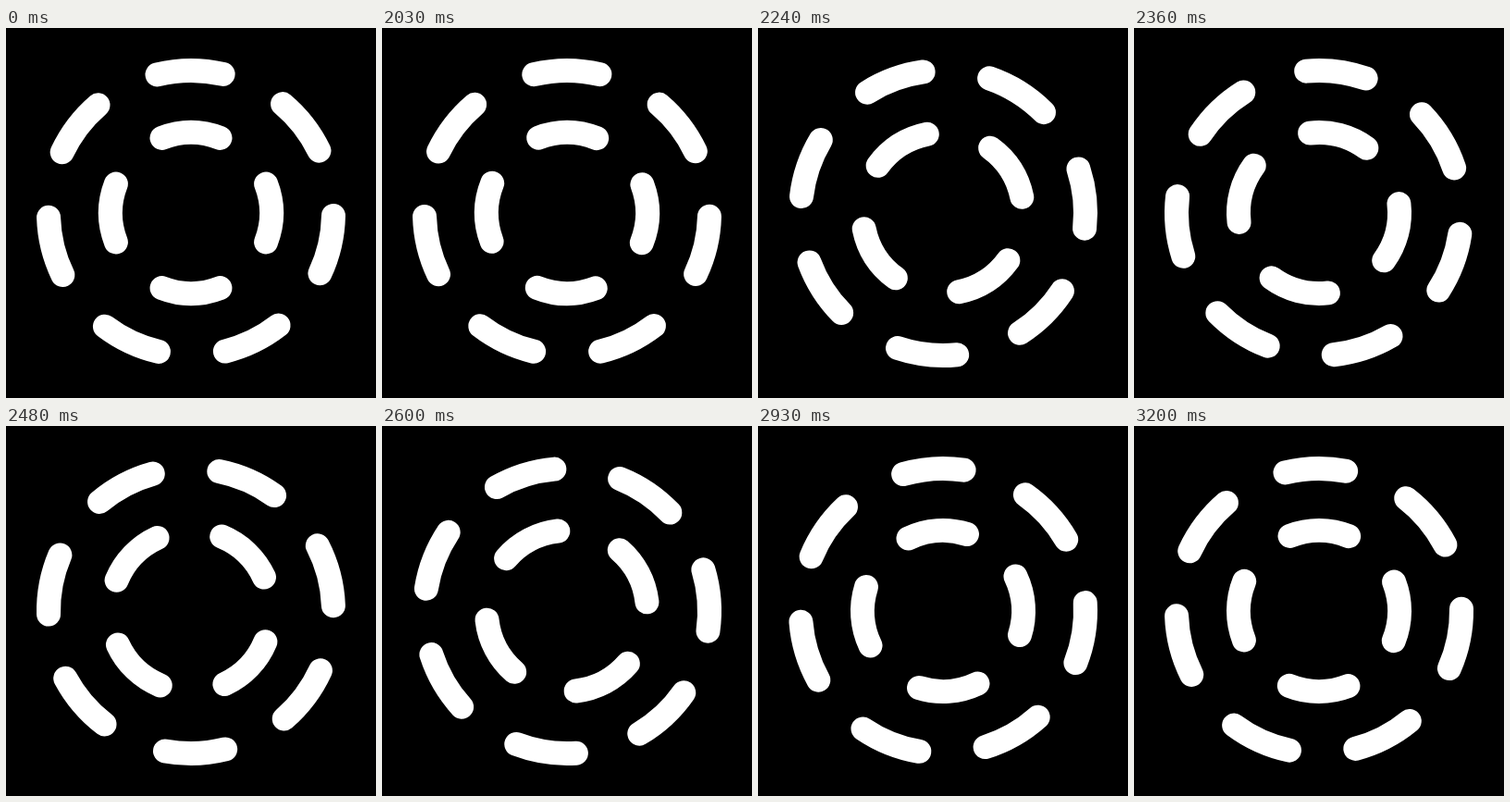
Write an HTML page with a canvas that moves like this. It is 400x400 px and loops after 3230 ms.

```html
<!DOCTYPE html>
<html>
<head>
<meta charset="utf-8">
<title>Turning rings</title>
<style>
html, body { margin: 0; width: 100%; height: 100%; overflow: hidden; background: #000; }
canvas { display: block; }
</style>
</head>
<body>
<canvas id="stage" width="400" height="400"></canvas>
<script>
const ctx = document.getElementById('stage').getContext('2d');
const LOOP = 3230, HOLD = 2030, STEP = 30, TURN = 1200;

// Angles are in degrees, clockwise from the top; slack is the surplus of the first dash at rest.
const rings = [
  { radius: 154, count: 7, start: -13.7, slack: 2.7, dash: [24, 24.6] },
  { radius: 87, count: 4, start: -21.2, slack: 0, dash: [42.4, 42.9] }
];

const mix = (a, b, p) => a + (b - a) * p;

function bezier(t, a, b) {
  const u = 1 - t;
  return 3 * a * t * u * u + 3 * b * t * t * u + t * t * t;
}

function ease(x) {
  if (x <= 0 || x >= 1) return x <= 0 ? 0 : 1;
  let lo = 0, hi = 1;
  for (let i = 0; i < 30; i++) {
    const mid = (lo + hi) / 2;
    if (bezier(mid, 0.28, 0.09) < x) lo = mid; else hi = mid;
  }
  return bezier(lo, 0, 1);
}

function drawArc(radius, from, length) {
  const rad = deg => (deg - 90) * Math.PI / 180;
  ctx.beginPath();
  ctx.arc(200, 200, radius, rad(from), rad(from + length));
  ctx.stroke();
}

function drawRing({ radius, count, start, slack, dash }, p) {
  const from = start + p * 720 / count;
  const extra = slack * (1 - p);
  const pitch = (360 - extra) / count;
  const length = mix(dash[0], dash[1], p);
  drawArc(radius, from, length + extra);
  for (let i = 1; i < count; i++) drawArc(radius, from + extra + i * pitch, length);
}

function draw(time) {
  const t = time % LOOP;
  const steps = t < HOLD ? 0 : Math.floor((t - HOLD) / STEP) + 1;
  const p = ease(steps * STEP / TURN);
  ctx.fillStyle = '#000';
  ctx.fillRect(0, 0, 400, 400);
  ctx.strokeStyle = '#fff';
  ctx.lineWidth = 26;
  ctx.lineCap = 'round';
  for (const ring of rings) drawRing(ring, p);
}

const began = performance.now();
function tick() {
  draw(performance.now() - began);
  requestAnimationFrame(tick);
}
tick();
</script>
</body>
</html>
```
